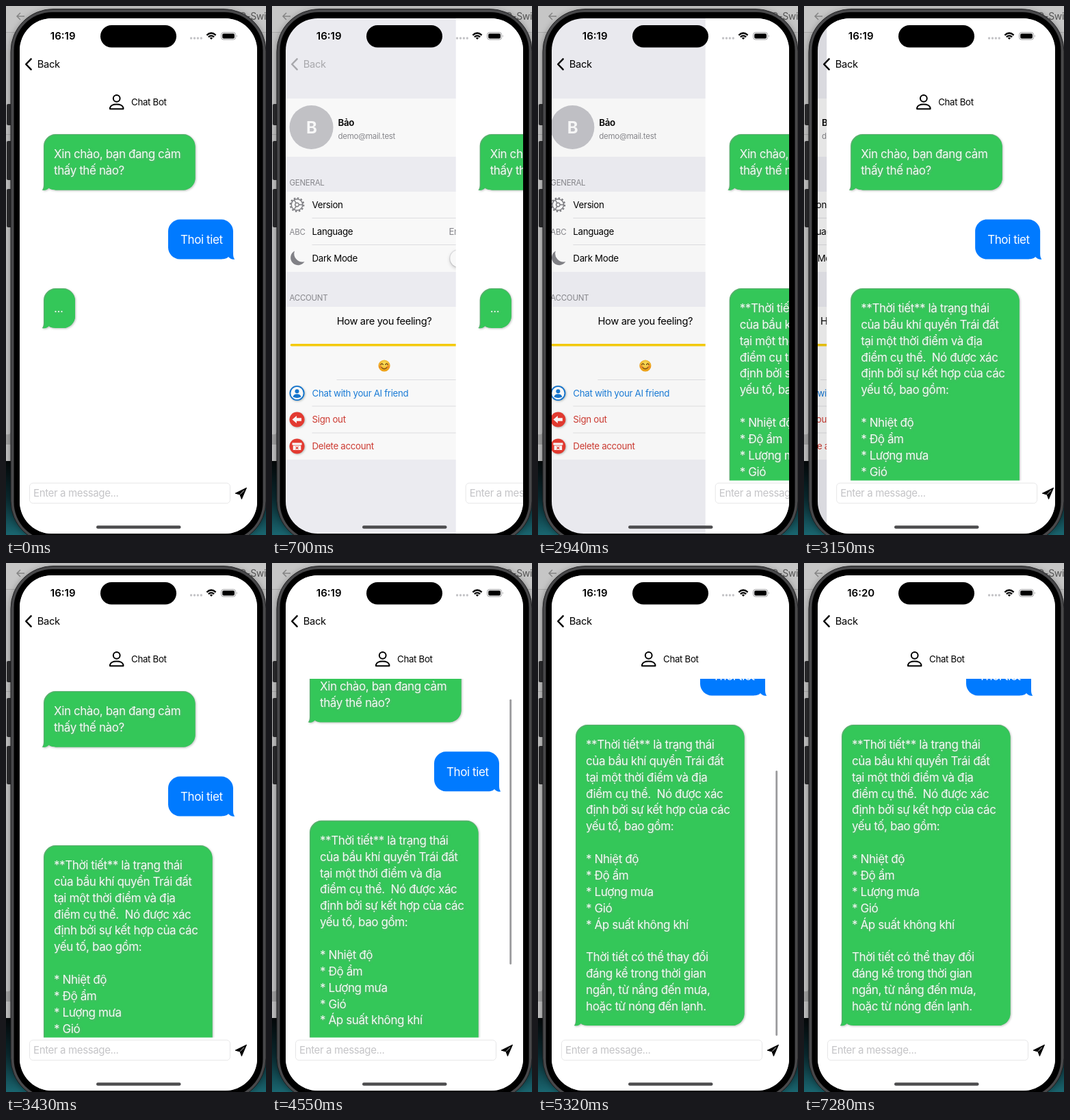
These frames come from a looping animation (380x772 px, 7.49 s). An HTML page:

```html
<!DOCTYPE html>
<html lang="vi">
<head>
<meta charset="utf-8">
<title>Chat</title>
<style>
  html, body { margin: 0; width: 100%; height: 100%; overflow: hidden; background: #c4c4c4; }
  svg { display: block; width: 380px; height: 772px; }
  text {
    font-family: Inter, "Noto Sans", sans-serif;
    font-optical-sizing: none;
    letter-spacing: -.024em;
    white-space: pre;
  }
  .bubble { font-size: 17px; fill: #f3fbf4; }
  .row { font-size: 13.3px; }
  .body { font-size: 14.7px; }
  .small { font-size: 11.5px; fill: #8a8a8f; }
  .mid { text-anchor: middle; }
  .end { text-anchor: end; fill: #8a8a8f; }
  .blue { fill: #1b7fdc; }
  .red { fill: #d23c33; }
  .soft { filter: drop-shadow(1.5px 1.5px 1.5px rgba(140, 150, 143, .6)); }
  .knob { fill: #fff; filter: drop-shadow(0 2px 2.5px rgba(0, 0, 0, .22)); }
  .line { stroke: #dcdce0; stroke-width: .8; }
  .ink { fill: none; stroke: #000; stroke-linecap: round; stroke-linejoin: round; }
</style>
</head>
<body>
<svg viewBox="0 0 380 772">
  <defs>
    <clipPath id="screen"><rect x="20" y="18" width="347" height="752" rx="47"/></clipPath>
    <clipPath id="list"><rect x="20" y="169" width="347" height="523.5"/></clipPath>
    <linearGradient id="wall" x2="0" y2="1">
      <stop offset="0" stop-color="#050809"/>
      <stop offset=".5" stop-color="#0a2a30"/>
      <stop offset="1" stop-color="#1a6670"/>
    </linearGradient>
    <radialGradient id="face" cy=".35">
      <stop offset=".2" stop-color="#ffe25a"/>
      <stop offset="1" stop-color="#f4a81c"/>
    </radialGradient>
  </defs>

  <!-- desktop -->
  <rect width="380" height="772" fill="#c2c2c2"/>
  <rect width="380" height="38" fill="#c6c6c6"/>
  <path d="M0 38.5H380M0 187.5H8" stroke="#a9a9a9"/>
  <path d="M0 625Q7 627 8 618V640H0Z" fill="#a2a2a2"/>
  <rect y="664" width="380" height="108" fill="url(#wall)"/>
  <path d="M27 15H16M21 10L16 15L21 20" fill="none" stroke="#858585" stroke-width="1.5"/>
  <text x="341" y="20" font-size="14" fill="#555">G-Swi</text>

  <!-- phone -->
  <g fill="#2b2b2d">
    <rect x="1" y="143" width="8" height="31" rx="2"/>
    <rect x="1" y="197" width="8" height="57" rx="2"/>
    <rect x="1" y="267" width="8" height="56" rx="2"/>
  </g>
  <rect x="7" y="4.5" width="373" height="780" rx="62" fill="#48484a" stroke="#1c1c1e"
        style="filter:drop-shadow(0 2px 5px rgba(0,0,0,.35))"/>
  <rect x="11.5" y="9" width="364" height="771" rx="56"/>

  <g clip-path="url(#screen)">
    <g id="settings">
      <rect x="-20" y="-60" width="560" height="900" fill="#f2f2f7"/>
      <g fill="#fff">
        <rect x="38" y="101" width="311" height="85" rx="9"/>
        <rect x="38" y="237" width="311" height="117" rx="9"/>
        <rect x="38" y="405" width="311" height="223" rx="9"/>
      </g>
      <circle cx="87" cy="143" r="32" fill="#c6c6cb"/>
      <text x="87" y="151.5" class="mid" font-size="24" font-weight="700" fill="#fff">B</text>
      <text x="126" y="140.5" class="row" font-weight="600">Bảo</text>
      <text x="126" y="160" class="small">demo@mail.test</text>

      <text x="55" y="228" class="small">GENERAL</text>
      <path class="line" d="M88 275.5H349M88 314.5H349M124 511.5H349M88 550H349M88 589H349"/>
      <g transform="translate(66 256)" fill="none" stroke="#7f7f84" stroke-width="1.4">
        <circle r="8.3"/>
        <circle r="9.8" stroke-width="2" stroke-dasharray="2.56 2.57"/>
        <circle r="2.8"/>
        <path d="M2.8 0H8.3M-1.4 -2.4L-4.2 -7.2M-1.4 2.4L-4.2 7.2"/>
      </g>
      <text x="55" y="299.5" class="small">ABC</text>
      <path d="M62.5 323.5A11 11 0 1 0 77 339A12 12 0 0 1 62.5 323.5Z" fill="#85858a"/>
      <text x="88" y="261" class="row">Version</text>
      <text x="331" y="261" class="row end">1.0.0</text>
      <text x="88" y="300" class="row">Language</text>
      <text x="331" y="300" class="row end">English</text>
      <text x="88" y="339" class="row">Dark Mode</text>
      <rect x="288.5" y="321" width="45" height="27" rx="13.5" fill="#e9e9eb"/>
      <circle class="knob" cx="302" cy="334.5" r="12.2"/>

      <text x="55" y="396" class="small">ACCOUNT</text>
      <text x="193.5" y="431" class="body mid">How are you feeling?</text>
      <path d="M58 460.7H319" stroke="#fbd00c" stroke-width="3.6" stroke-linecap="round"/>
      <circle class="knob" cx="319.5" cy="460" r="12.3"/>
      <g transform="translate(193.5 491)" fill="none" stroke="#70400f" stroke-width="1.2" stroke-linecap="round">
        <circle r="8.6" fill="url(#face)" stroke="none"/>
        <path d="M-5.2 -1.6Q-3.4 -4.6 -1.6 -1.6M1.6 -1.6Q3.4 -4.6 5.2 -1.6M-4.2 2.4Q0 7 4.2 2.4"/>
        <g fill="#f2703a" fill-opacity=".55" stroke="none"><circle cx="-5.6" cy="1.4" r="1.9"/><circle cx="5.6" cy="1.4" r="1.9"/></g>
      </g>

      <g class="soft">
        <g transform="translate(66 531)">
          <circle r="10.1" fill="#fff" stroke="#1577d2" stroke-width="1.9"/>
          <circle cy="-2.7" r="3" fill="#1577d2"/>
          <path d="M-6 5.6Q-5 1.3 0 1.3T6 5.6Q0 8.4 -6 5.6Z" fill="#1577d2"/>
        </g>
        <g transform="translate(66 569.5)">
          <circle r="11" fill="#e93c32"/>
          <path d="M-7 0L-.5 -5.4V-2.2H6.5V2.2H-.5V5.4Z" fill="#fff"/>
        </g>
        <g transform="translate(66 608.5)">
          <circle r="11" fill="#e93c32"/>
          <path d="M-7 -5H7V-1.8H-7ZM-5.8 -.9H5.8V5.6H-5.8Z" fill="#fff"/>
          <path d="M-1.9 .6L1.9 4.2M1.9 .6L-1.9 4.2" stroke="#e93c32" stroke-width="1.2"/>
        </g>
      </g>
      <text x="88" y="535.7" class="row blue">Chat with your AI friend</text>
      <text x="88" y="574.3" class="row red">Sign out</text>
      <text x="88" y="613.2" class="row red">Delete account</text>
    </g>
    <rect id="dim" x="20" y="18" width="347" height="754"/>

    <g id="chat">
      <rect x="20" y="0" width="400" height="780" fill="#fff"/>
      <g class="ink" stroke-width="2">
        <circle cx="161.7" cy="134.8" r="4.9"/>
        <path d="M152 150.2V148.5Q153.5 143.6 161.7 143.6T171.4 148.5V150.2Z"/>
      </g>
      <text x="183" y="145" class="row">Chat Bot</text>
      <g clip-path="url(#list)"><g id="messages"></g></g>
      <rect id="bar" x="347.3" width="2.8" rx="1.4" fill="#9b9b9d"/>
      <rect x="34.5" y="696.2" width="293" height="29.5" rx="5" fill="#fff" stroke="#e6e6e7"/>
      <text x="40" y="716.3" font-size="15" fill="#c4c4c7">Enter a message...</text>
      <rect id="caret" x="40.4" y="700.5" width="1.9" height="21" rx=".9" fill="#007aff"/>
      <path d="M351.5 703.2L335.2 711.2L342 713L344.4 719.6Z" stroke="#000" stroke-linejoin="round"/>
      <path d="M342.3 712.6L348 706.8" stroke="#fff" stroke-width=".8"/>
    </g>

    <g id="back">
      <path class="ink" d="M36.6 77.3L29.2 85L36.6 92.7" stroke-width="2.5"/>
      <text x="45.8" y="90.2" class="body">Back</text>
    </g>

    <!-- status bar -->
    <text id="clock" x="83.2" y="49.3" class="mid" font-size="15" font-weight="600" style="letter-spacing:0"></text>
    <rect x="138" y="28" width="111" height="32.5" rx="16.2"/>
    <path d="M270.6 47H286" stroke="#c3c3c6" stroke-width="3.4" stroke-linecap="round" stroke-dasharray="0 4.9"/>
    <g fill="none" stroke="#000" stroke-width="2.2">
      <path d="M293.4 42.6Q300 36.4 306.6 42.6M295.8 45.3Q300 41.3 304.2 45.3"/>
      <path d="M300 49L297.7 46.6Q300 44.8 302.3 46.6Z" fill="#000" stroke="none"/>
    </g>
    <rect x="314.6" y="38.6" width="21" height="10.4" rx="3.2" fill="none" stroke="#9c9c9e"/>
    <rect x="316.2" y="40.2" width="17.8" height="7.2" rx="1.9"/>
    <path d="M337 42.2Q338.8 43.8 337 45.4Z" fill="#9c9c9e"/>
    <rect x="132" y="758.3" width="123.5" height="4.4" rx="2.2" fill="#4c4c4e"/>
  </g>
</svg>

<script>
const LOOP = 7490, STEP = 70, WIDTH = 347, REST = 176, OVER = 16;
const $ = id => document.getElementById(id);

const greeting = ["Xin chào, bạn đang cảm", "thấy thế nào?"];
const reply = [
  "**Thời tiết** là trạng thái", "của bầu khí quyển Trái đất", "tại một thời điểm và địa",
  "điểm cụ thể.  Nó được xác", "định bởi sự kết hợp của các", "yếu tố, bao gồm:", "",
  "* Nhiệt độ", "* Độ ẩm", "* Lượng mưa", "* Gió", "* Áp suất không khí", "",
  "Thời tiết có thể thay đổi", "đáng kể trong thời gian", "ngắn, từ nắng đến mưa,", "hoặc từ nóng đến lạnh."
];

// Rounded bubble with a tail at the lower left; x is the body's left edge.
const shape = (w, h, r = 17, k = 8) =>
  `M${r} ${h}H${w - r}C${w - k} ${h} ${w} ${h - k} ${w} ${h - r}V${r}` +
  `C${w} ${k} ${w - k} 0 ${w - r} 0H${r}C${k} 0 0 ${k} 0 ${r}V${h - 8}` +
  `C0 ${h - 1} -2.5 ${h} -2.5 ${h}C1 ${h + 1} 4.5 ${h - .6} 7 ${h - 3.4}C9 ${h} ${r} ${h} ${r} ${h}Z`;

const botBubble = (id, y, w, h, lines) => `
  <g id="${id}" transform="translate(55 ${y})">
    <g class="soft">
      <path d="${shape(w, h)}" fill="#55b06b"/>
      <path d="${shape(w - 1.3, h - 1.3)}" transform="translate(1.3 1.3)" fill="#34c759"/>
    </g>
    <g class="bubble soft">${lines.map((s, i) =>
      `<text x="15" y="${(35 + i * 23.87).toFixed(2)}">${s}</text>`).join("")}</g>
  </g>`;

$("messages").innerHTML =
  botBubble("hello", 187, 221.5, 81.5, greeting) +
  `<path d="${shape(95, 58)}" transform="translate(332 311.5) scale(-1 1)" fill="#007aff"/>
   <text x="255" y="346.7" class="bubble" style="fill:#fff">Thoi tiet</text>` +
  botBubble("typing", 412, 46, 58, ["..."]) +
  botBubble("reply", 412, 246.5, 439, reply);

const show = (id, a) => $(id).setAttribute("opacity", a);

// Critically damped spring from 0 to 1, time in ms.
const spring = (ms, w = 18.26) => {
  const x = Math.max(0, ms) * w / 1000;
  return 1 - (1 + x) * Math.exp(-x);
};

function scrollAt(t) {
  if (t < 4410) return 0;
  if (t < 4900) return (REST + OVER) * (1 - Math.cos(Math.PI * (t - 4410) / 490)) / 2;
  return t < 5320 ? REST + OVER * (1 - spring(t - 4900, 12)) : REST;
}

// Share of the screen taken by the chat.
function coverAt(t) {
  if (t < 630) return 1;
  if (t < 1190) return 1 - spring(t - 562);
  if (t < 2940) return 0;
  return t < 3430 ? spring(t - 2872) : 1;
}

function render(time) {
  const t = Math.floor(time % LOOP / STEP) * STEP;
  const cover = coverAt(t), scroll = scrollAt(t);
  const popping = t < 1190, barShown = popping || t >= 2940;

  $("chat").setAttribute("transform", `translate(${WIDTH * (1 - cover)} 0)`);
  $("settings").setAttribute("transform", `translate(${-104 * cover} ${barShown ? 34 : 0})`);
  show("dim", .1 * cover);
  show("back", barShown ? (popping ? cover : Math.min(1, cover * 3)) : 0);

  show("typing", popping ? 1 : 0);
  show("reply", popping ? 0 : 1);
  show("caret", t < 210 || t >= 630 ? 0 : t < 280 ? .5 : 1);
  $("messages").setAttribute("transform", `translate(0 ${-scroll})`);

  const top = 172 + Math.min(scroll, REST) * 131 / REST + Math.max(0, scroll - REST);
  $("bar").setAttribute("y", top);
  $("bar").setAttribute("height", 387 - Math.max(0, scroll - REST));
  show("bar", t < 4480 || t >= 6580 ? 0 : t < 6510 ? 1 : .45);

  $("clock").textContent = t < 7280 ? "16:19" : "16:20";
}

const start = performance.now();
(function tick() {
  render(performance.now() - start);
  requestAnimationFrame(tick);
})();
</script>
</body>
</html>
```
